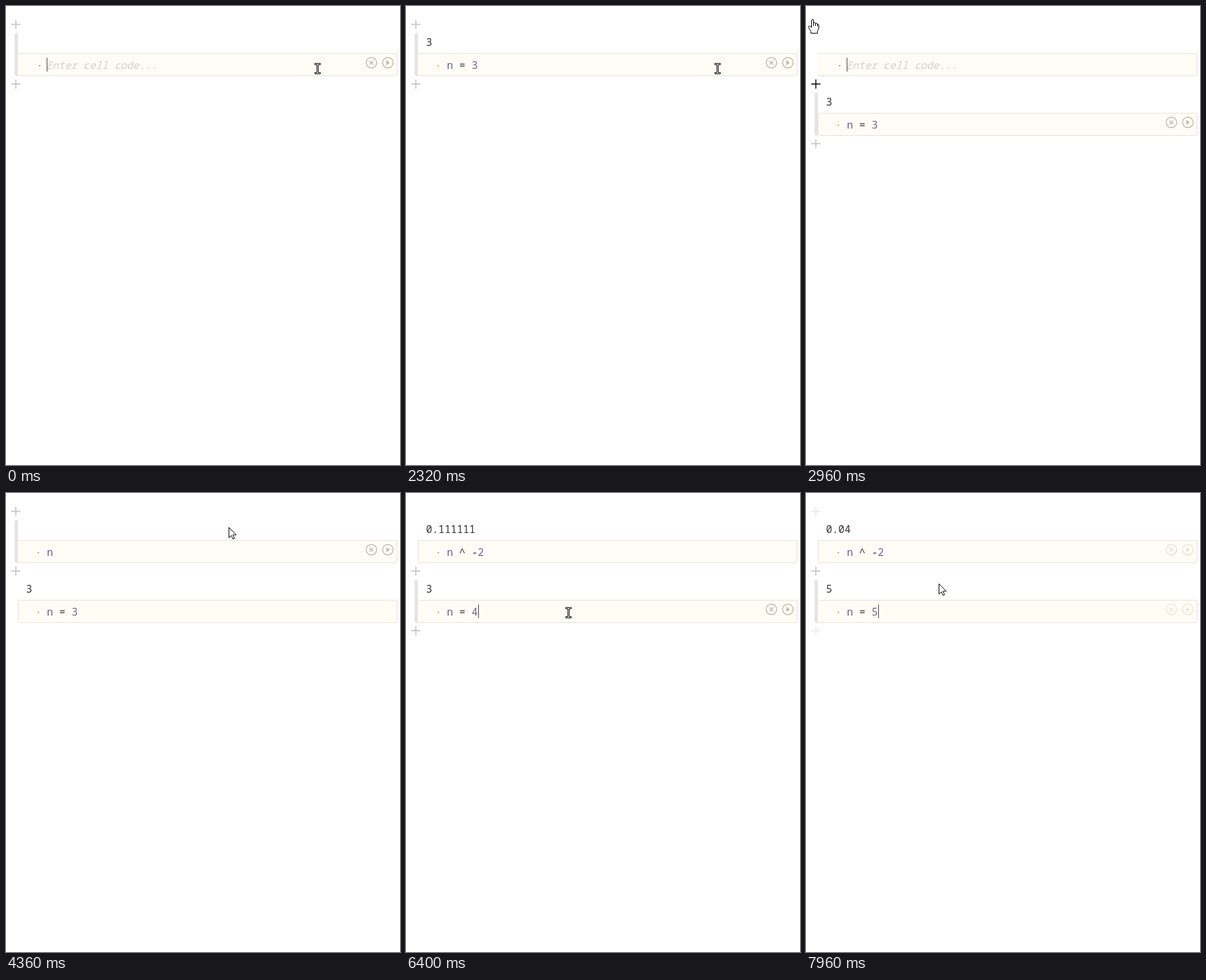
Recreate the animation shown at these times as an HTML page. Size 600 by 700 pixels, loop 8000 ms.

```html
<!DOCTYPE html>
<html lang="en">
<head>
<meta charset="utf-8">
<title>Reactive notebook</title>
<style>
  html, body { margin: 0; width: 100%; height: 100%; overflow: hidden; background: #fff; }
  svg { display: block; }
  text { font: 15.7px "Roboto Mono", "Noto Sans Mono", "DejaVu Sans Mono", monospace; white-space: pre; }
  .out { fill: #333; }
  .var { fill: #5b5f98; font-weight: 500; }
  .num { fill: #78609f; }
  .op { fill: #41323f; }
  .hint { fill: #d3d0c8; font-style: italic; font-weight: 300; }
  .box { fill: #fffcf5; }
  .edge { fill: none; stroke: #e6e2d9; }
  .bar { fill: #e4e4e4; }
  .icon { fill: none; stroke: #bdbab4; stroke-width: 1.4; }
  .icon .solid { fill: #bdbab4; stroke: none; }
  .caret { fill: #444; }
  .dot { fill: #8a857c; }
  .plus { fill: none; stroke-width: 1.4; }
  .shape { fill: #fff; stroke: #000; stroke-linejoin: round; }
</style>
</head>
<body>
<svg id="stage" width="600" height="700" viewBox="0 0 600 700"></svg>
<script>
const LOOP = 8000, TICK = 40, BLINK = 340;
const CHAR = 9.42, CODE_X = 62.2, ROW = 91;
const SPLIT = 2960, RETURN = 5520, LEAVE = 7800;
const stage = document.getElementById('stage');

// Keyboard and focus: A is the first cell, B the one inserted above it
const input = [
  [-60, 'focus A'],
  [1120, 'n'], [1320, ' '], [1400, '='], [1480, ' '], [1640, '3'], [1960, 'run'],
  [SPLIT, 'focus B'],
  [3920, 'n'], [4020, ' '], [4440, '^'], [4520, ' '], [4600, '-'], [4720, '2'], [5000, 'run'],
  [RETURN, 'focus A'],
  [6320, 'erase'], [6400, '4'], [6640, 'run'], [6880, 'erase'], [6920, '5'], [7120, 'run']
];

// Pointer moves: [start, end, x, y]
const moves = [
  [2360, 2840, 9, 20], [3000, 3160, 339, 52], [5360, 5520, 109, 180],
  [5760, 6040, 247, 182], [7680, 7960, 202, 138]
];

const ramp = (t, from, span) => Math.min(1, Math.max(0, (t - from) / span));
const ease = k => k * k * (3 - 2 * k);

// Replays the input up to t; B recomputes whenever n changes
function notebook(t) {
  const code = { A: '', B: '' }, out = { A: '', B: '' };
  let focus = 'A', last = 0, ranB = false;
  for (const [at, key] of input) {
    if (at > t) break;
    last = at;
    if (key.startsWith('focus')) focus = key.slice(-1);
    else if (key === 'erase') code[focus] = code[focus].slice(0, -1);
    else if (key === 'run') {
      out.A = code.A.slice(4);
      ranB = ranB || focus === 'B';
      if (ranB) out.B = String(+(out.A ** -2).toPrecision(6));
    } else code[focus] += key;
  }
  return { code, out, focus, caret: (t - last) % (2 * BLINK) < BLINK };
}

function mouse(t) {
  let x = 474, y = 95;
  for (const [from, to, mx, my] of moves) {
    const k = ease(ramp(t, from, to - from));
    x += (mx - x) * k;
    y += (my - y) * k;
  }
  return [Math.round(x), Math.round(y)];
}

function pointerKind(x, y, split) {
  if (x < 24) return 'hand';
  const inEditor = top => y >= top && y <= top + 35;
  return inEditor(72) || (split && inEditor(72 + ROW)) ? 'beam' : 'arrow';
}

function codeText(code) {
  if (!code) return `<text class="hint" x="${CODE_X - .8}" y="96">Enter cell code...</text>`;
  return [...code].map((c, i) => {
    if (c === ' ') return '';
    const kind = /[a-z]/.test(c) ? 'var' : /\d/.test(c) ? 'num' : 'op';
    return `<text class="${kind}" x="${CODE_X + i * CHAR}" y="96">${c}</text>`;
  }).join('');
}

function icons(opacity) {
  return `<g class="icon" opacity="${opacity}">
    <circle cx="556.5" cy="86.5" r="8"/><path d="M553.7 83.7l5.6 5.6m0-5.6l-5.6 5.6"/>
    <circle cx="581.5" cy="86.5" r="8"/><path class="solid" d="M579.3 82.5v8l5.2-4z"/></g>`;
}

function cell(id, book, y, bar, tools) {
  const code = book.code[id], focused = book.focus === id;
  const caretX = Math.round(CODE_X + .2 + code.length * CHAR);
  // A focused cell has no left border
  const edge = 'M18 72.5H595.5V103a3.5 3.5 0 0 1-3.5 3.5H22' + (focused ? 'H18' : 'a3.5 3.5 0 0 1-3.5-3.5V72.5');
  return `<g transform="translate(0 ${y})">
    <path class="box" d="M18 72H596V103a4 4 0 0 1-4 4H22a4 4 0 0 1-4-4z"/>
    <path class="edge" d="${edge}"/>
    <path class="bar" opacity="${bar}" d="M18 41V107H17a4 4 0 0 1-4-4V45a4 4 0 0 1 4-4z"/>
    <circle class="dot" cx="${code ? 49.3 : 51.3}" cy="91" r="${code ? .9 : 1.1}"/>
    <text class="out" x="30.4" y="61">${book.out[id]}</text>
    ${codeText(code)}
    ${focused && book.caret ? `<rect class="caret" x="${caretX}" y="79" width="1" height="21"/>` : ''}
    ${icons(tools)}</g>`;
}

function plus(i, opacity, ink) {
  const shade = Math.round(190 * (1 - ink));
  return `<path class="plus" stroke="rgb(${shade},${shade},${shade})" opacity="${opacity}"
    d="M8 ${28 + i * ROW}h14m-7-7v14"/>`;
}

const pointers = {
  beam: `<path d="M-4-6.5H5M-4 7.5H5M.5-6.5V7.5" fill="none" stroke="#000" stroke-width="3"/>
    <path d="M-3-6.5H4M-3 7.5H4M.5-6.5V7.5" fill="none" stroke="#fff"/>`,
  arrow: `<path class="shape" d="M.5.5V16.2L4.1 12.8 6.6 18.2 9 17.1 6.5 11.9H11.6z"/>`,
  hand: `<path class="shape" d="M-.5 13V2Q-.5.5 1 .5T2.5 2V5.5Q5.5 4.5 5.5 6.5 8.5 5.5 8.5 8
    10.5 7.5 10.5 10V14L8.5 18V21.5H-1.5V18.5L-5.5 12.5Q-5.5 10.5-3.5 10.5-2 10.5-.5 13z"/>
    <path class="shape" d="M2.5 5v5.5M5.5 6.5v4M8.5 8v3"/>`
};

function draw(t) {
  const split = t >= SPLIT, book = notebook(t);
  const [x, y] = mouse(t);
  const bar = ramp(t, SPLIT, 200) - ramp(t, RETURN - 80, 200);
  const active = ramp(t, SPLIT, 200) - ramp(t, RETURN, 200);
  const leave = ramp(t, LEAVE, 400);
  const upper = active + leave, lower = 1 - active - 1.7 * leave;
  const hover = !split && x < 24 ? 1 : 0;
  stage.innerHTML = (split ? cell('B', book, 0, bar, upper) : '')
    + cell('A', book, split ? ROW : 0, 1 - bar, lower)
    + plus(0, split ? upper : 1, hover)
    + plus(1, 1, split ? 1 - ramp(t, SPLIT, 200) : 0)
    + (split ? plus(2, lower, 0) : '')
    + `<g transform="translate(${x} ${y})">${pointers[pointerKind(x, y, split)]}</g>`;
}

const start = performance.now();
let last = -1;
function frame() {
  const elapsed = Math.max(0, performance.now() - start) % LOOP;
  const t = Math.floor(elapsed / TICK) * TICK;
  if (t !== last) draw(last = t);
  requestAnimationFrame(frame);
}
frame();
</script>
</body>
</html>
```
